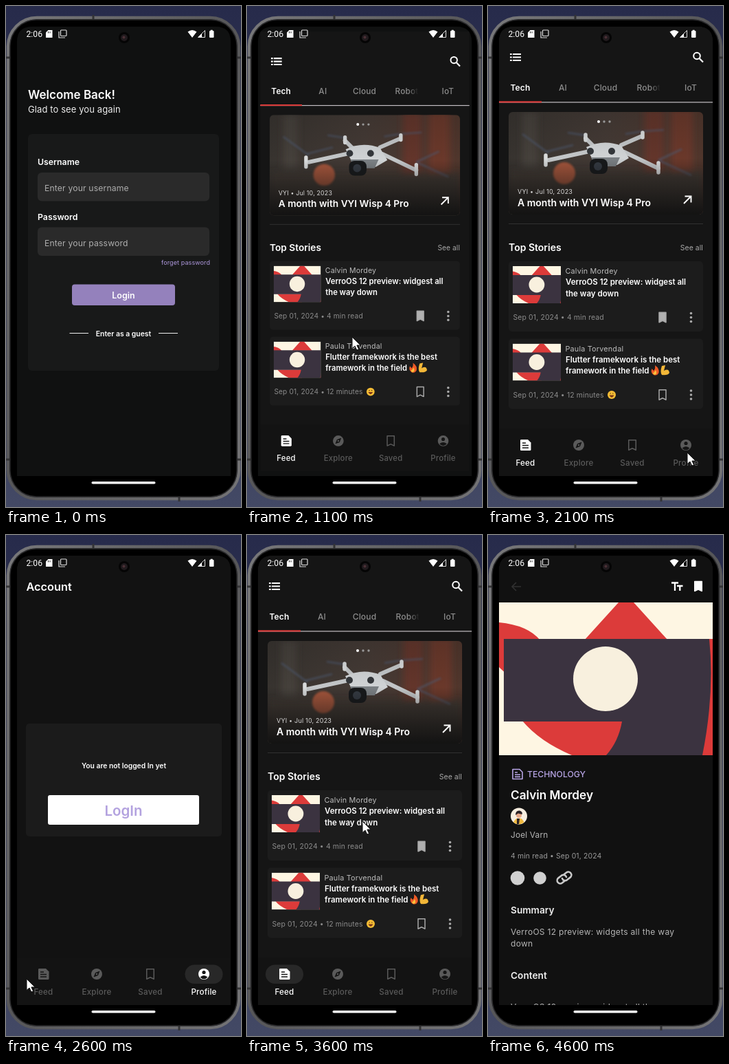
These frames come from a looping animation (342x728 px, 4.7 s). An HTML page:

```html
<!DOCTYPE html>
<html lang="en">
<head>
<meta charset="utf-8">
<title>News app</title>
<style>
html, body { margin: 0; width: 100%; height: 100%; overflow: hidden; background: #2b2f4d; }
svg { display: block; }
text { font-family: Inter, "Open Sans", sans-serif; white-space: pre; }
.time { font-family: Roboto, sans-serif; }
</style>
</head>
<body>
<svg id="stage" width="342" height="728" viewBox="0 0 342 728"></svg>
<script>
const LOOP = 4700, STEP = 100;
const TABS = [54.5, 132, 210, 288];

const text = (x, y, s, size, fill = '#fff', weight = 400, anchor = 'start', gap = 0) =>
  `<text x="${x}" y="${y}" font-size="${size}" fill="${fill}" font-weight="${weight}" text-anchor="${anchor}" letter-spacing="${gap}">${s}</text>`;
const rect = (x, y, w, h, fill, r = 0, more = '') =>
  `<rect x="${x}" y="${y}" width="${w}" height="${h}" rx="${r}" fill="${fill}" ${more}/>`;
const dot = (x, y, r, fill, more = '') => `<circle cx="${x}" cy="${y}" r="${r}" fill="${fill}" ${more}/>`;
const path = (d, fill, more = '') => `<path d="${d}" fill="${fill}" ${more}/>`;
const line = (d, color, width = 2, more = '') =>
  path(d, 'none', `stroke="${color}" stroke-width="${width}" ${more}`);
const bookmark = (x, y, w, h, fill, stroke = fill) =>
  path(`M${x - w / 2} ${y - h / 2}h${w}v${h}l${-w / 2} ${-h * .17}l${-w / 2} ${h * .17}z`, fill,
    `stroke="${stroke}" stroke-width="1.5" stroke-linejoin="round"`);
const fade = (id, attrs, ...stops) => `<linearGradient id="${id}" ${attrs}>` +
  stops.map(([at, color, alpha = 1]) => `<stop offset="${at}" stop-color="${color}" stop-opacity="${alpha}"/>`).join('') +
  '</linearGradient>';

const defs = `<defs>
  <clipPath id="screen"><path d="M16 683V52Q16 30 38 30H305Q327 30 327 52V683z"/></clipPath>
  <clipPath id="hero"><rect x="30" y="154" width="283" height="149" rx="6"/></clipPath>
  <filter id="soft"><feGaussianBlur stdDeviation="5"/></filter>
  <filter id="haze"><feGaussianBlur stdDeviation="1.5"/></filter>
  ${fade('wall', '', [0, '#37332f'], [.5, '#443a35'], [1, '#50362c'])}
  ${fade('shade', 'x2="0" y2="1"', [0, '#111', .15], [.45, '#111', 0], [1, '#111', .95])}
  ${fade('cut', 'gradientUnits="userSpaceOnUse" x1="236" x2="251"', [0, '#8c8c8c'], [1, '#8c8c8c', 0])}
  ${fade('metal', 'x2="1" y2="1"', [0, '#78787a'], [.5, '#565658'], [1, '#747476'])}
  ${fade('room', 'x2="0" y2="1"', [0, '#272b4b'], [.5, '#343856'], [1, '#434965'])}
  <symbol id="cover" viewBox="16 98 311 222" preserveAspectRatio="xMidYMid slice">
    ${rect(16, 98, 311, 222, '#fef6e3')}
    ${path('M140 153L190 98H212L262 153zM16 127Q58 131 76 153L30 205 16 192zM50 270Q75 300 122 320H200V270z', '#dc3b3a')}
    ${path('M23 151H327V320H172Q190 300 195 271H23z', '#3b3340')}
    ${path('M322 151H327V320H312Q330 230 322 151z', '#dc3b3a')}
    ${dot(171, 209, 47, '#f8f0de')}
  </symbol>
</defs>`;

const phone = rect(0, 0, 342, 728, 'url(#room)') +
  rect(3, 17, 336, 699, '#050505', 42, 'stroke="url(#metal)" stroke-width="4.5"') +
  rect(6, 20, 330, 693, '#000', 38, 'stroke="#2c2c2e" stroke-width="1.5"') +
  line('M0 75H5M0 659H5M337 75H342M337 659H342M127 13V19M252 714V720', '#343436', 3);

const field = (y, label, hint) => text(46, y, label, 12.3, '#fff', 600) +
  rect(46, y + 11, 250, 41.5, '#2a2a2a', 6) + text(56, y + 38, hint, 12.2, '#adadad', 400, 'start', .15);

const login = rect(16, 30, 311, 653, '#101111') +
  text(32, 135, 'Welcome Back!', 17, '#fff', 600) +
  text(32, 155, 'Glad to see you again', 13, '#eee', 400, 'start', .1) +
  rect(32, 186, 278, 344, '#181919', 6) +
  field(231, 'Username', 'Enter your username') +
  field(310.5, 'Password', 'Enter your password') +
  text(297, 375.5, 'forget password', 9, '#ae98dd', 400, 'end', .1) +
  rect(96, 404.5, 150, 30.5, '#9481bc', 4) +
  text(171, 424.5, 'Login', 12.5, '#fff', 600, 'middle') +
  text(171, 479.5, 'Enter as a guest', 10.4, '#fff', 600, 'middle') +
  line('M92.5 475.5H120M222 475.5H250', '#eee', 1.2);

const drone = `<g clip-path="url(#hero)">
  ${rect(30, 154, 283, 149, 'url(#wall)')}
  <g filter="url(#soft)">
    ${rect(228, 150, 28, 95, '#64352a')}${rect(266, 150, 32, 90, '#6a392c')}
    ${rect(30, 240, 283, 70, '#3f3833')}${rect(50, 154, 22, 80, '#45403b')}
  </g>
  ${dot(111, 243, 16, '#b25a3c', 'opacity=".9" filter="url(#haze)"')}
  ${line('M50 186L88 214M84 212L124 202M116 184L142 188M200 186L225 182M226 182L256 180M248 224L296 246M248 224L282 208', '#4d5a72', 2.5, 'opacity=".65" filter="url(#haze)"')}
  ${line('M148 211L88 224M198 212L248 236M152 202L142 192M194 202L224 189', '#c3c6c8', 6, 'stroke-linecap="round"')}
  ${line('M84 217V231M248 228V242M142 187V195M225 184V191', '#d9dbdc', 5.5, 'stroke-linecap="round"')}
  ${path('M143 205Q168 193 194 203L205 221 188 231H156z', '#d0d3d5')}
  ${path('M150 220H192L186 233H156z', '#7b8084')}
  ${dot(149, 211, 5, '#33363a')}${dot(180, 211, 5, '#33363a')}
  ${rect(148, 222, 26, 22, '#17191b', 8)}${dot(160, 233, 6, '#343a42')}
  ${rect(30, 154, 283, 149, 'url(#shade)')}
</g>`;

const grin = dot(180, 565, 6, '#f6bd35') + line('M177.5 563h1.5M181 563h1.5', '#5b3a15', 1.2) +
  path('M176.5 565.5H183.5Q180 572 176.5 565.5z', '#783418');
const flame = path('M243 522Q250 527 248.5 533Q246 538 241 536Q236 533 238.5 527L241 530Q244 527 243 522z', '#ee5a26') +
  path('M244 529Q247 535 242.5 536Q238 534 242 532z', '#f9c13b');
const muscle = path('M253 523L258 522 257 526 256 530Q263 526 264 533Q262 537 253 536Q250 532 253 523z', '#f3b738');

const story = (y, author, lines, meta, saved) => rect(30, y, 283, 102, '#1c1c1c', 5) +
  `<svg x="36" y="${y + 7}" width="70" height="54"><use href="#cover" width="70" height="54"/></svg>` +
  text(112.5, y + 18, author, 10.8, '#bcbcbc', 400, 'start', .2) +
  lines.map((s, i) => text(113, y + 34 + i * 16.7, s, 11.5, '#fff', 600)).join('') +
  text(36.5, y + 85, meta, 10.4, '#8b8b8b', 400, 'start', .15) +
  bookmark(254, y + 81.5, 10, 14.5, saved ? '#b0b0b0' : 'none', '#a8a8a8') +
  [75.5, 81.5, 87.5].map(d => dot(295.5, y + d, 1.8, '#aaa')).join('');

const feed = rect(16, 30, 311, 590, '#151515') +
  line('M32 70h2.8M32 74.5h2.8M32 79h2.8M36 70h12M36 74.5h12M36 79h12', '#fff', 2.2) +
  dot(304, 72.5, 4.8, 'none', 'stroke="#fff" stroke-width="2"') + line('M307.5 76L313 81.5', '#fff', 2.2) +
  ['Tech', 'AI', 'Cloud', '', 'IoT'].map((s, i) =>
    text(47 + i * 62, 123, s, 12, i ? '#8c8c8c' : '#fff', i ? 500 : 600, 'middle', .2)).join('') +
  text(216.5, 123, 'Robot', 12, 'url(#cut)', 500, 'start', .2) +
  rect(16, 139.3, 311, 1.2, '#c4bfc4') + rect(16, 138.3, 62, 2.2, '#d93b3a') +
  drone + dot(161, 168, 2, '#fff') + dot(169, 168, 1.7, '#999') + dot(177, 168, 1.7, '#999') +
  text(43, 273, 'VYI • Jul 10, 2023', 9, '#d8d8d8', 400, 'start', .2) +
  text(43, 290.5, 'A month with VYI Wisp 4 Pro', 14, '#fff', 600) +
  line('M285 287L295 277M286.5 276.5H295.5V285.5', '#fff', 1.9) +
  rect(30, 316, 283, 1, '#303030') +
  text(30, 356, 'Top Stories', 14, '#fff', 600) +
  text(313, 355, 'See all', 10.4, '#a9a9a9', 400, 'end', .1) +
  story(371, 'Calvin Mordey', ['VerroOS 12 preview: widgest all', 'the way down'], 'Sep 01, 2024 • 4 min read', true) +
  story(483.5, 'Paula Torvendal', ['Flutter framekwork is the best', 'framework in the field'], 'Sep 01, 2024 • 12 minutes', false) +
  grin + flame + muscle;

const account = text(29.5, 81, 'Account', 16.3, '#fff', 600) +
  rect(29, 274, 285, 164, '#1b1b1b', 5) +
  text(171.5, 339, 'You are not logged In yet', 10.3, '#fff', 600, 'middle') +
  rect(61, 378, 220, 43, '#fff', 3) +
  text(171, 407.5, 'LogIn', 20.5, '#b3a2df', 600, 'middle');

const hole = '#151515';
const icons = [
  path('M47 631Q47 630 48.5 630H58L62.5 634.5V644.5Q62.5 646 61 646H48.5Q47 646 47 644.5z', 'currentColor') +
    line('M50 635H55M50 638.5H59M50 642H59', hole, 1.5),
  dot(132, 638, 8, 'currentColor') + path('M136.5 633.5L134 640 127.5 642.5 130 636z', hole) + dot(132, 638, 1.2, 'currentColor'),
  bookmark(210, 638, 10.5, 14.5, 'none', 'currentColor'),
  dot(288, 638, 8, 'currentColor') + dot(288, 635.5, 2.6, hole) + path('M282.5 642.5Q288 637.5 293.5 642.5Q288 648 282.5 642.5z', hole)
];
const nav = rect(16, 614, 311, 69, '#131313') + rect(0, 624.5, 55, 27.5, '#fff', 13.75, 'id="pill"') +
  ['Feed', 'Explore', 'Saved', 'Profile'].map((s, i) =>
    `<g class="tab">${icons[i]}${text(TABS[i], 668, s, 11.6, 'currentColor', 500, 'middle', .2)}</g>`).join('');

const chain = `<g transform="translate(111 498) rotate(-38)">${
  line('M-2.5 4H-7A4.5 4.5 0 0 1 -7 -5H-1A4.5 4.5 0 0 1 3 1M2.5 -4H7A4.5 4.5 0 0 1 7 5H1A4.5 4.5 0 0 1 -3 -1', '#c9c9c9', 2.6, 'stroke-linecap="round"')}</g>`;

const article = rect(16, 30, 311, 653, '#111') +
  line('M48 75H35M41 69L35 75 41 81', '#303030', 1.6) +
  line('M267 69.5H277M272 69.5V81M275 74H283.5M279.3 74V81', '#fff', 2.3) +
  bookmark(306, 74.5, 10.5, 14, '#fff') +
  '<use href="#cover" x="16" y="98" width="311" height="222"/>' +
  line('M36 340.5H46L50 344.5V354.5H36zM39 345H43M39 348.2H47M39 351.4H47', '#b8a5e6', 1.6, 'stroke-linejoin="round"') +
  text(57, 351.5, 'TECHNOLOGY', 12.2, '#b8a5e6', 500) +
  text(33, 384, 'Calvin Mordey', 17.2, '#fff', 600) +
  dot(45, 408.5, 12, '#f8eee0') + path('M37 417.5Q40 411 45 412Q50 411 52.5 417.5Q45 423 37 417.5z', '#efb93f') +
  dot(45, 407, 4, '#e7a889') + path('M40 407Q40 400 46 400.5Q51 402 49.5 406L44 404.5z', '#2b2226') +
  path('M42 412H46L45 420H42z', '#2b2226') +
  text(33, 440, 'Joel Varn', 11.8, '#b5b5b5', 400, 'start', .2) +
  text(33, 470, '4 min read • Sep 01, 2024', 10.4, '#9a9a9a', 400, 'start', .15) +
  dot(43, 498.5, 10.3, '#d0d0d0') + dot(75.5, 498.5, 9.3, '#d0d0d0') + chain +
  text(33, 550, 'Summary', 13.7, '#eee', 600) +
  text(33, 581, 'VerroOS 12 preview: widgets all the way', 12, '#b5b5b5', 400, 'start', .3) +
  text(33, 598, 'down', 12, '#b5b5b5', 400, 'start', .3) +
  text(33, 645, 'Content', 13.7, '#eee', 600) +
  text(33, 690, 'VerroOS 12 preview: widgest all the way', 12, '#b5b5b5', 400, 'start', .3);

const status = text(29.5, 44.5, '2:06', 12.2).replace('<text', '<text class="time"') +
  path('M58 38.5L61.5 35H67.5V46H58z', '#fff') + line('M61.5 37V39.5M64 37V39.5', '#222', 1) +
  rect(79.5, 35, 8.5, 8.5, 'none', 1, 'stroke="#ddd" stroke-width="1.2"') + line('M77 37V46H86', '#ddd', 1.2) +
  path('M264.5 37.5Q271 32.5 277.5 37.5L271 46z', '#fff') +
  path('M279.5 45.5L289.5 35.5V45.5z', 'none', 'stroke="#ddd" stroke-width="1"') + path('M279.5 45.5L285 40V45.5z', '#fff') +
  rect(296, 36, 6.5, 10, '#fff', 1) + rect(297.7, 34.8, 3, 2, '#fff') +
  dot(172, 46, 8, '#050505') + dot(172, 46, 5, '#211b1e') + dot(171.5, 45.5, 2, '#4a3035') +
  rect(124.5, 691, 93, 3.6, '#fff', 1.8);

const group = (id, body) => `<g id="${id}">${body}</g>`;
const stage = document.getElementById('stage');
stage.innerHTML = defs + phone + '<g clip-path="url(#screen)">' + group('login', login) +
  group('home', rect(16, 30, 311, 653, '#121212') + group('account', account) + group('feed', feed) + group('nav', nav)) +
  group('article', article) + '</g>' + status +
  group('cursor', path('M0 0V16.5L4 13 6.8 19 9.6 17.7 6.9 12H12.2z', '#fff', 'stroke="#111" stroke-width="1"'));

const get = id => document.getElementById(id);
const tabs = [...stage.querySelectorAll('.tab')];
const clamp = v => Math.max(0, Math.min(1, v));
const easeOut = x => 1 - (1 - x) ** 3;
const smooth = x => x * x * (3 - 2 * x);

// Start times of the page changes; each one runs for 300 ms.
const GUEST = 957, PROFILE = 2250, BACK = 3095, OPEN = 3830;
const since = (t, start) => clamp((t - start) / 300);
const reveal = x => clamp(x * 3.5);

// Pointer stops: time, x, y
const STOPS = [[300, 176, 740], [800, 153, 481], [1300, 153, 481], [2000, 290, 649], [2250, 290, 649],
  [2550, 30, 645], [2700, 30, 645], [2900, 45, 642], [3050, 45, 642], [3200, 104, 498],
  [3500, 168, 416], [4150, 168, 416], [4400, 190, 740]];

function pointer(t) {
  const i = STOPS.findIndex(s => s[0] > t);
  if (i < 1) return [0, 800];
  const a = STOPS[i - 1], b = STOPS[i], k = smooth((t - a[0]) / (b[0] - a[0]));
  return [a[1] + (b[1] - a[1]) * k, a[2] + (b[2] - a[2]) * k];
}

function place(id, scale, opacity = 1, cy = 356.5) {
  const el = get(id);
  el.setAttribute('transform', `translate(171.5 ${cy}) scale(${scale}) translate(-171.5 ${-cy})`);
  el.setAttribute('opacity', opacity);
}

function draw(t) {
  const guest = since(t, GUEST), profile = since(t, PROFILE), back = since(t, BACK), open = since(t, OPEN);
  const grow = (from, x) => from + (1 - from) * easeOut(x);

  place('login', 1 + .05 * easeOut(guest));
  place('home', open ? 1 + .05 * easeOut(open) : grow(.85, guest), reveal(guest));
  place('article', grow(.85, open), reveal(open));
  place('account', grow(.92, profile), 1, 318);
  place('feed', back ? grow(.92, back) : 1, back ? reveal(back) : 1 - reveal(profile), 318);

  const selected = profile && !back ? 3 : 0;
  tabs.forEach((tab, i) => tab.style.color = i === selected ? '#fff' : '#5a5a5a');
  const pill = get('pill');
  pill.setAttribute('x', TABS[selected] - 27.5);
  pill.setAttribute('opacity', profile && !open ? .29 - .2 * (back || profile) : 0);

  get('cursor').setAttribute('transform', `translate(${pointer(t)})`);
}

function tick() {
  draw(Math.floor(performance.now() % LOOP / STEP) * STEP);
  requestAnimationFrame(tick);
}
tick();
</script>
</body>
</html>
```
